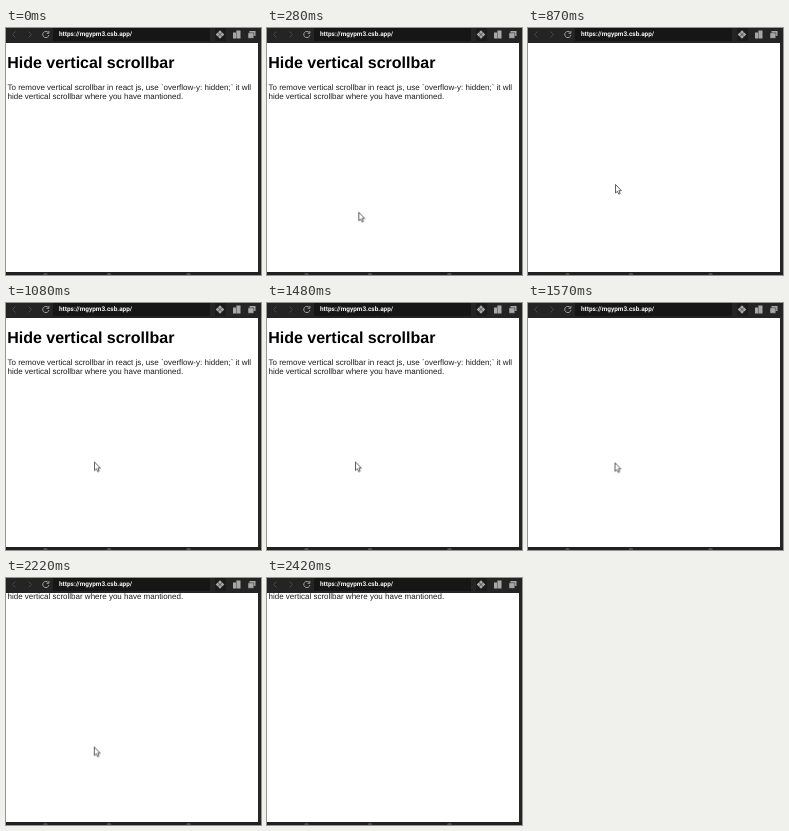
An HTML page for the animation above (2890 ms loop, 255 px wide and 247 px high).

```html
<!DOCTYPE html>
<html lang="en">
<head>
<meta charset="utf-8">
<title>Hide vertical scrollbar</title>
<style>
  html, body { margin: 0; width: 100%; height: 100%; overflow: hidden; background: #fff; }
  svg { display: block; width: 255px; height: 247px; }
  text { text-rendering: geometricPrecision; }
  .page { font-family: "Liberation Sans", Arial, sans-serif; animation: scroll 2890ms step-end infinite; }
  .title { font-size: 16px; font-weight: 700; fill: #000; }
  .copy { font-size: 8px; fill: #1c1c1c; }
  .url { font: 700 6.45px Roboto, sans-serif; fill: #f4f4f4; }
  .line { fill: none; stroke-width: 1; }
  .cursor { animation: point 2890ms linear infinite; }

  /* Wheel scrolling: down, up, down, part of the way up */
  @keyframes scroll {
    0%     { transform: translateY(0); }
    14.18% { transform: translateY(-2px); }
    15.22% { transform: translateY(-9px); }
    16.26% { transform: translateY(-34px); }
    17.3%  { transform: translateY(-72px); }
    32.52% { transform: translateY(-58px); }
    33.56% { transform: translateY(-34px); }
    34.6%  { transform: translateY(-16px); }
    35.63% { transform: translateY(-6px); }
    36.33% { transform: translateY(-2px); }
    37.36% { transform: translateY(0); }
    52.24% { transform: translateY(-6px); }
    53.28% { transform: translateY(-32px); }
    54.32% { transform: translateY(-64px); }
    55.01% { transform: translateY(-72px); }
    71.97% { transform: translateY(-68px); }
    73.01% { transform: translateY(-60px); }
    74.04% { transform: translateY(-54px); }
    75.08% { transform: translateY(-51px); }
    76.12%, 100% { transform: translateY(-50px); }
  }
  @keyframes point {
    0%, 0.7%       { transform: translate(104px, 250px); }
    13.5%, 16.2%   { transform: translate(86px, 156px); }
    17.3%, 32.5%   { transform: translate(87px, 156px); }
    37.3%, 52.24%  { transform: translate(88px, 158.5px); }
    55%, 76.1%     { transform: translate(86px, 159.5px); }
    83.7%, 100%    { transform: translate(104px, 250px); }
  }
</style>
</head>
<body>
<svg viewBox="0 0 255 247">
  <rect width="255" height="247" fill="#fff"/>

  <g class="page">
    <text class="title" x="1.2" y="40">Hide vertical scrollbar</text>
    <text class="copy" x="1.5" y="62">To remove vertical scrollbar in react js, use `overflow-y: hidden;` it wll</text>
    <text class="copy" x="1.5" y="71">hide vertical scrollbar where you have mantioned.</text>
  </g>

  <!-- Browser frame -->
  <rect width="255" height="15" fill="#242424"/>
  <rect x="47" y="0" width="157" height="13" fill="#161616"/>
  <rect x="209" y="0" width="11" height="13" fill="#1b1b1b"/>
  <rect x="252" y="14" width="3" height="233" fill="#262626"/>
  <rect y="244" width="255" height="3" fill="#202022"/>
  <g fill="#4c4c4c">
    <circle cx="39.5" cy="247" r="2.3"/>
    <circle cx="103" cy="247" r="2.3"/>
    <circle cx="182.5" cy="247" r="2.3"/>
  </g>

  <!-- Toolbar -->
  <g class="line" stroke="#484848">
    <path d="M9.5 3.5 6.5 6.5 9.5 9.5"/>
    <path d="M22.5 3.5 25.5 6.5 22.5 9.5"/>
  </g>
  <path class="line" stroke="#a0a0a0" d="M42.3 4.6A3.1 3.1 0 1 0 42.9 7M42.9 3V5.3H40.6"/>
  <text class="url" x="53" y="8.4">https://mgypm3.csb.app/</text>
  <g fill="#a8a8a8">
    <path d="M214 2.2 216 4.2 214 6.2 212 4.2ZM214 6.8 216 8.8 214 10.8 212 8.8ZM211.7 4.5 213.7 6.5 211.7 8.5 209.7 6.5ZM216.3 4.5 218.3 6.5 216.3 8.5 214.3 6.5Z"/>
    <path d="M227 4.5H230V10.5H227ZM230.4 2.5H234.5V10.5H230.4Z"/>
    <path d="M243.5 3H249.5V8H243.5Z"/>
    <path d="M242 4.8H247.8V10.3H242Z" stroke="#242424" stroke-width=".5"/>
  </g>

  <path class="cursor" d="M.5 .5V9L2.4 7.3 3.8 10.2 5.2 9.5 3.9 6.7H6.4Z" fill="#fff" stroke="#383838" stroke-width=".8"/>
</svg>
</body>
</html>
```
